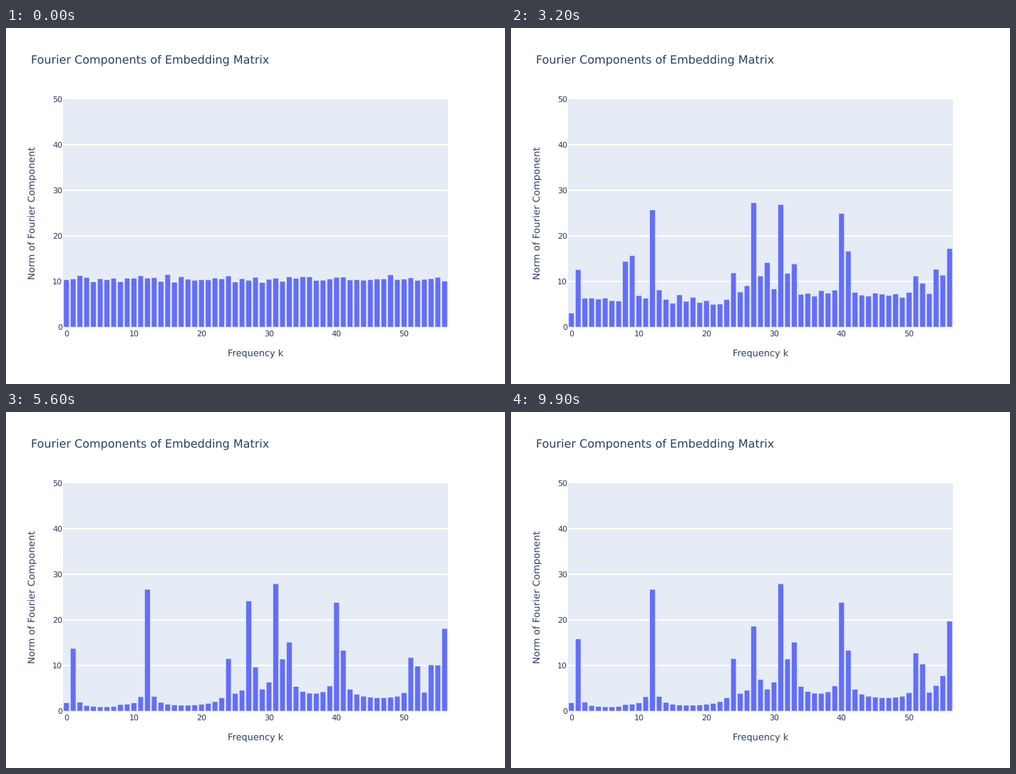
Write a matplotlib script that moves like this. It is 700 px wide and 500 px high and loops after 10000 ms.

```python
import numpy as np
import matplotlib.pyplot as plt
from matplotlib.animation import FuncAnimation
from matplotlib.patches import Rectangle

plt.rcParams["font.family"] = "DejaVu Sans"
plt.rcParams["text.hinting"] = "none"

W, H, DPI = 700, 500, 100
LEFT, TOP, RIGHT, BASE = 80, 100, 620, 420
N = 57
STEP = (RIGHT - LEFT) / N
UNIT = (BASE - TOP) / 50
INK, PANEL, BAR = "#2a3f5f", "#e5ecf6", "#636efa"

FORMED = 24     # end of the growth phase
CLEAN = 54      # most bars have settled by here
LAST = 99
SWELL = 3.8     # extra height in the middle of the growth phase

# Frequencies that stand out: norm once formed, norm at the end
QUICK = {0: (3.5, 1.8), 8: (19.1, 1.4), 9: (20.8, 1.5), 12: (25.3, 26.7),
         24: (12, 11.5), 29: (17.5, 4.8), 31: (26.5, 27.9),
         32: (11.9, 11.4), 33: (13.4, 15.1), 40: (25.3, 23.8),
         41: (17.8, 13.3)}
SLOW = {1: (12.2, 15.8), 27: (28.3, 18.6), 28: (11.7, 6.9),
        51: (11, 12.7), 52: (9.5, 10.3), 54: (13.5, 5.6),
        55: (11.8, 7.7), 56: (16.9, 19.7)}

rng = np.random.default_rng(4)
freq = np.arange(N)
start = rng.normal(10.6, 0.4, N)
formed = rng.normal(10.6, 1.3, N)

# The floor is raised near every strong frequency
settled = -0.4 + 1.4 / (1 + np.exp((25 - freq) / 2))
for k, (_, level) in (QUICK | SLOW).items():
    if level > 10:
        settled += 0.1 * level / np.maximum(abs(freq - k), 1)

settle_end = np.full(N, CLEAN)
power = np.full(N, 2.3)
for group, end in ((QUICK, CLEAN), (SLOW, LAST)):
    for k, levels in group.items():
        formed[k], settled[k] = levels
        settle_end[k] = end
        power[k] = 1


def ease_out(u, p):
    return 1 - (1 - u) ** p


def norms(frame):
    if frame < FORMED:
        u = frame / FORMED
        grown = start + (formed - start) * ease_out(u, 1.4)
        return grown + SWELL * np.sin(np.pi * u)
    u = np.minimum((frame - FORMED) / (settle_end - FORMED), 1)
    return formed + (settled - formed) * ease_out(u, power)


def px(size):
    return size * 72 / DPI


def label(x, y, text, size, ha="center", rotation=0):
    ax.text(x, y, text, fontsize=px(size), color=INK, ha=ha, va="baseline",
            rotation=rotation, rotation_mode="anchor")


def box(x, y, w, h, color):
    ax.add_patch(Rectangle((x, y), w, h, fc=color, lw=0))


fig = plt.figure(figsize=(W / DPI, H / DPI), dpi=DPI, facecolor="white")
ax = fig.add_axes([0, 0, 1, 1])
ax.axis("off")

box(LEFT, TOP, RIGHT - LEFT, BASE - TOP, PANEL)
for tick in range(0, 60, 10):
    y = BASE - tick * UNIT
    if tick < 50:
        box(LEFT, y - 1, RIGHT - LEFT, 2, "white")
    label(79, y + 4, str(tick), 11, ha="right")
    if tick < N:
        label(LEFT + (tick + 0.5) * STEP, 433, str(tick), 11)

label(35, 50, "Fourier Components of Embedding Matrix", 16, ha="left")
label(350, 461, "Frequency k", 12.95)
label(41, 260, "Norm of Fourier Component", 13.35, rotation=90)

bars = ax.bar(LEFT + (freq + 0.5) * STEP, -norms(0) * UNIT,
              width=0.8 * STEP, bottom=BASE, color=BAR, edgecolor=PANEL,
              linewidth=px(0.5), snap=False, zorder=2)
ax.set_xlim(0, W)
ax.set_ylim(H, 0)


def update(frame):
    for bar, value in zip(bars, norms(frame)):
        bar.set_height(-value * UNIT)
    return bars.patches


anim = FuncAnimation(fig, update, frames=LAST + 1, interval=100, repeat=True,
                     repeat_delay=0, blit=False)
plt.show()
```
